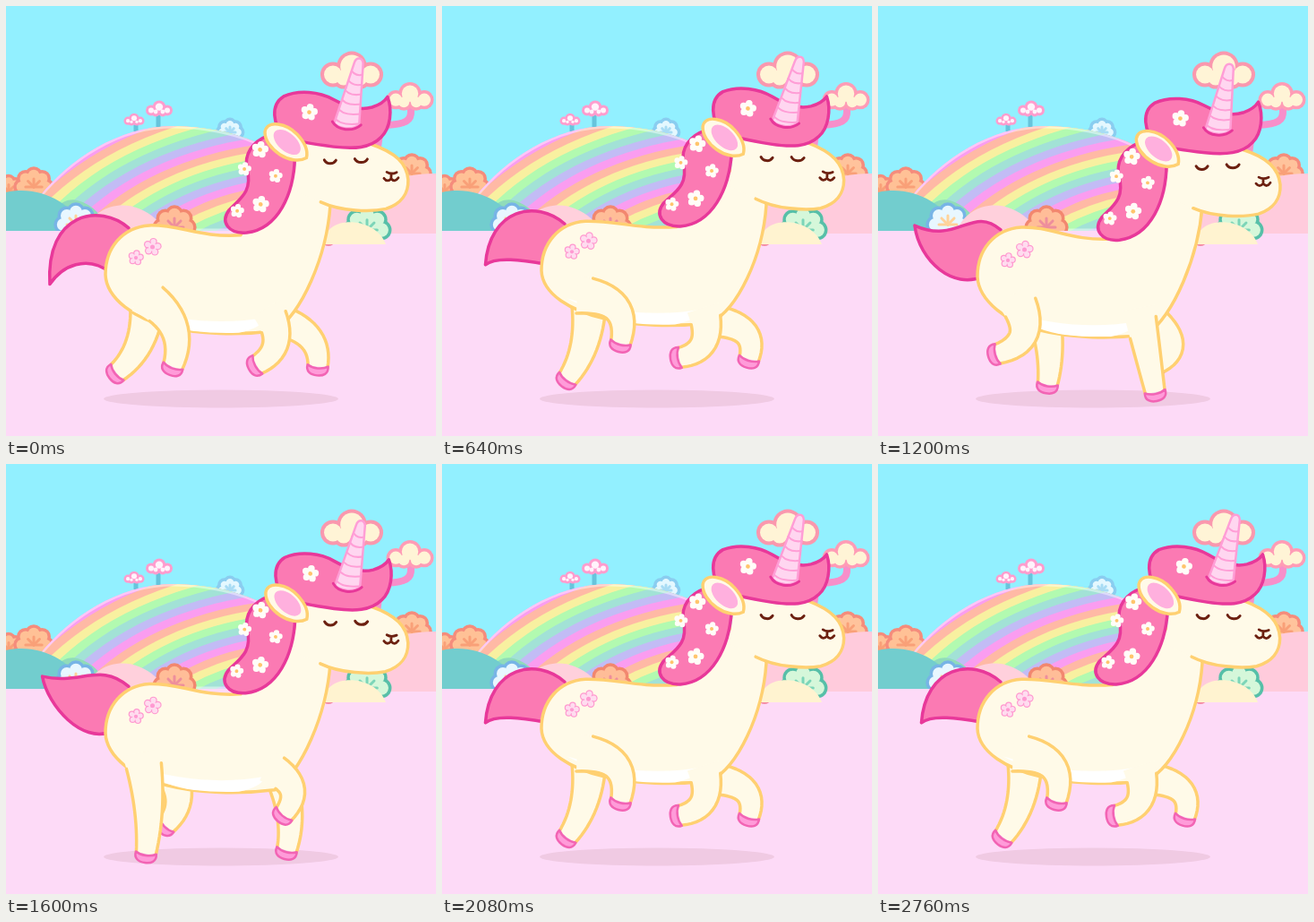
These frames come from a looping animation (480 px wide and 480 px high, 2.8 s). An HTML page with a canvas:

```html
<!DOCTYPE html>
<html lang="en">
<head>
<meta charset="utf-8">
<title>Trotting unicorn</title>
<style>
html, body { margin: 0; width: 100%; height: 100%; overflow: hidden; background: #92f0ff; }
canvas { display: block; width: 480px; height: 480px; }
</style>
</head>
<body>
<canvas id="stage" width="480" height="480"></canvas>
<script>
const ctx = document.getElementById('stage').getContext('2d');
const CREAM = '#fffae8', GOLD = '#ffd071', PINK = '#fb7ab3', ROSE = '#e8389a', BROWN = '#6c2010';
const LOOP = 2800, STEP = 40, CYCLE = 17, HALF = CYCLE / 2;

// Hoof paths over one stride: time, x, lift above the ground
const hindPath = [[0, 183, 33], [4, 155, 0], [8, 97, 42], [11, 124, 53], [15, 197, 59]];
const frontPath = [[0, 272, 35], [4, 304, 42], [8, 336, 36], [11, 311, 0], [12.5, 299, 0], [15, 256, 46]];

// Far legs run the same path half a stride later
const legs = {
  nearHind: { path: hindPath, lag: 0, dx: 0, ground: 444, lift: 1, hip: [151, 322], sway: 0, length: 124, width: 21 },
  farHind: { path: hindPath, lag: HALF, dx: 20, ground: 434, lift: 0.42, hip: [180, 334], sway: 0.35, length: 100, width: 19 },
  nearFront: { path: frontPath, lag: 0, dx: 0, ground: 440, lift: 1, hip: [291, 337], sway: 0, length: 102, width: 18 },
  farFront: { path: frontPath, lag: HALF, dx: 12, ground: 440, lift: 0.9, hip: [308, 352], sway: 0, length: 92, width: 17 }
};

const wave = (x, period, peak) => Math.cos(2 * Math.PI * (x - peak) / period);
const mix = (a, b, t) => a + (b - a) * t;

// Smooth closed curve through [time, x, y] points
function follow(path, x) {
  const n = path.length;
  const key = i => {
    const [t, ...v] = path[(i + n) % n];
    return { t: t + Math.floor(i / n) * CYCLE, v };
  };
  let i = n - 1;
  while (path[i][0] > x) i--;
  const [p, a, b, q] = [-1, 0, 1, 2].map(d => key(i + d));
  const span = b.t - a.t, u = (x - a.t) / span, u2 = u * u, u3 = u2 * u;
  return a.v.map((from, j) => {
    const to = b.v[j];
    const m0 = (to - p.v[j]) / (b.t - p.t) * span, m1 = (q.v[j] - from) / (q.t - a.t) * span;
    return mix(from, to, 3 * u2 - 2 * u3) + (u3 - 2 * u2 + u) * m0 + (u3 - u2) * m1;
  });
}

function shape(d, fill, stroke, width = 3.5) {
  const p = typeof d === 'string' ? new Path2D(d) : d;
  if (fill) { ctx.fillStyle = fill; ctx.fill(p); }
  if (stroke) { ctx.strokeStyle = stroke; ctx.lineWidth = width; ctx.stroke(p); }
}

function oval(x, y, rx, ry, fill, turn = 0) {
  const p = new Path2D();
  p.ellipse(x, y, rx, ry, turn, 0, 7);
  shape(p, fill);
}

function blobs(list, grow, color) {
  for (const [x, y, r] of list) oval(x, y, r + grow, r + grow, color);
}

function treetop(x, y, w, edge, fill, line) {
  const list = [[x, y - w * 0.08, w * 0.24 - line]];
  for (const side of [-1, 1]) {
    list.push([x + side * w * 0.3, y + w * 0.05, w * 0.2 - line]);
    list.push([x + side * w * 0.13, y + w * 0.1, w * 0.18 - line]);
  }
  blobs(list, line, edge);
  blobs(list, 0, fill);
}

// n circles spread along an arc
function fan(x, y, n, from, turn, dist, r) {
  return Array.from({ length: n }, (_, i) => {
    const a = from + i * turn;
    return [x + Math.cos(a) * dist, y + Math.sin(a) * dist, r];
  });
}

function bush(x, y, r, edge, mid, core) {
  const list = fan(x, y, 5, Math.PI, Math.PI / 4, r * 0.62, r * 0.3);
  blobs(list, 3.5, edge);
  blobs(list, 0, mid);
  oval(x, y, r * 0.6, r * 0.6, mid);
  for (const [bx, by] of list) shape(`M${x} ${y}L${mix(x, bx, 0.7)} ${mix(y, by, 0.7)}`, null, core, 3);
}

function flower(x, y, r, petal, core, edge) {
  const list = fan(x, y, 5, -1.4, Math.PI * 0.4, r * 0.6, r * (edge ? 0.3 : 0.4));
  if (edge) blobs(list, 1.2, edge);
  blobs(list, 0, petal);
  oval(x, y, r * 0.45, r * 0.45, petal);
  oval(x, y, r * 0.25, r * 0.25, core);
}

function rainbowHill() {
  const colors = ['#fa9df0', '#ffb9a5', '#f8f0a0', '#b2fab0', '#a2e2d6', '#c2bcf5'];
  const hill = new Path2D('M38 212C70 172 125 134 187 134C250 135 310 155 350 205V251H38Z');
  ctx.save();
  ctx.clip(hill);
  shape(hill, '#fbc3ee');
  for (let i = 0; i < 25; i++) {
    const s = 1.015 - i * 0.03;
    oval(340, 360, 375 * s, 260 * s, colors[i % 6]);
  }
  shape(hill, null, '#ffffff70', 5);
  ctx.restore();
}

function scenery() {
  ctx.fillStyle = '#92f0ff';
  ctx.fillRect(0, 0, 480, 480);

  shape('M145 133V139M170 122V137', null, '#68c4dc', 5);
  treetop(143, 127, 23, '#ff9dce', '#fff3fb', 2.5);
  treetop(171, 115, 30, '#ff9dce', '#fff3fb', 3);
  bush(250, 141, 14, '#8acdf0', '#e4f8ff', '#a8dcf4');
  bush(3, 207, 17, '#f58c7c', '#ffc196', '#f9a078');
  bush(31, 202, 21, '#f58c7c', '#ffc196', '#f9a078');
  rainbowHill();

  shape('M452 116C453 128 446 132 425 133M419 128L414 165', null, '#f78fca', 8);
  treetop(386, 73, 70, '#fa98ae', '#fff4d6', 4);
  treetop(451, 102, 53, '#ff9cb6', '#fff4d6', 3.5);
  bush(453, 187, 21, '#f58c7c', '#ffc39c', '#f9a078');

  shape('M330 251V232C370 212 430 187 480 187V256H330Z', '#ffcbdc');
  shape('M45 251C50 225 65 213 80 217C98 222 108 235 115 251Z', '#90dcba');
  shape('M0 208C35 200 72 217 90 251H0Z', '#72cdce');
  bush(78, 244, 23, '#77b4e6', '#e8f7ff', '#ffd39a');
  shape('M88 251C98 226 125 217 148 226C164 232 172 242 178 251Z', '#ffd0dc');
  bush(188, 247, 23, '#f2876f', '#ffbd98', '#ee8e9c');

  ctx.fillStyle = '#fddaf7';
  ctx.fillRect(0, 251, 480, 229);
  ctx.fillStyle = '#ffcbdc';
  ctx.fillRect(340, 249, 140, 5);
  bush(403, 250, 26, '#56bfa8', '#d5f7da', '#7cd5b8');
  oval(360, 264, 6, 4, '#f48da5');
  shape('M356 266C352 233 412 233 424 266Z', '#fff3d0');
  oval(240, 438.5, 131, 10, '#f0cae3');
}

// Two-part leg: the shorter the reach, the further the joint bends forward
function drawLeg(leg, k, body) {
  const [pathX, lift] = follow(leg.path, (k + leg.lag) % CYCLE);
  const tx = pathX + leg.dx, ty = leg.ground - lift * leg.lift;
  const hx = leg.hip[0] + (tx - leg.hip[0]) * leg.sway, hy = leg.hip[1];
  const reach = Math.hypot(tx - hx, ty - hy);
  const bend = Math.sqrt(Math.max(0, leg.length ** 2 - reach ** 2)) / 2 / reach;
  const kx = (hx + tx) / 2 + (ty - hy) * bend, ky = (hy + ty) / 2 - (tx - hx) * bend;
  const aim = Math.atan2(ty - ky, tx - kx);
  const ax = tx - Math.cos(aim) * 9, ay = ty - Math.sin(aim) * 9;

  const front = [], back = [], N = 16;
  for (let i = 0; i <= N; i++) {
    const t = i / N;
    const x0 = mix(hx, kx, t), y0 = mix(hy, ky, t), x1 = mix(kx, ax, t), y1 = mix(ky, ay, t);
    const x = mix(x0, x1, t), y = mix(y0, y1, t), vx = x1 - x0, vy = y1 - y0;
    const w = mix(leg.width, 11, t) / Math.hypot(vx, vy);
    front.push([x + vy * w, y - vx * w]);
    back.push([x - vy * w, y + vx * w]);
  }
  const line = pts => 'M' + pts.join('L');
  const outside = body ? back.findIndex(p => !ctx.isPointInPath(body, ...p)) : 0;
  shape(line([...front, ...back.slice().reverse()]) + 'Z', CREAM);
  shape(line(front.slice(body ? 2 : 0)), null, GOLD);
  shape(line(back.slice(Math.min(outside, 5))), null, GOLD);

  ctx.save();
  ctx.translate(tx, ty);
  ctx.rotate(aim - Math.PI / 2);
  shape('M-11.5 -10C-5 -6 5 -6 11.5 -10C13 -2 7 1 0 1C-7 1 -13 -2 -11.5 -10Z', '#ff9bd9', '#f264b4', 2.5);
  ctx.restore();
}

// The tail whips once per bounce and swings lower on every second one
function drawTail(k, rump) {
  const x = 45 + 5 * wave(k, HALF, 7.6);
  const y = 269 + 33 * wave(k, HALF, 8.1) + 10 * wave(k, CYCLE, 0);
  const curl = 0.45 + 0.35 * wave(k, HALF, 7.8) + 0.28 * wave(k, CYCLE, 0);
  shape(`M137 ${243 + rump}C105 ${215 + rump} ${x + mix(50, -3, curl)} ${y + mix(25, -77, curl)} ${x} ${y}
    C${x + mix(5, 13, curl)} ${y + mix(42, -18, curl)} ${mix(84, 90, curl)} ${mix(318, 278, curl)} 117 ${288 + 2 * rump}`, PINK, ROSE);
}

function bodyPath(r, c) {
  return new Path2D(`M290 200L262 ${246 + c}C215 ${249 + c} 195 ${239 + r} 160 ${240 + r}
    C130 ${242 + r} 111 ${265 + r} 111 ${295 + r}C112 ${322 + r} 145 ${340 + c} 180 ${348 + c}
    C215 ${357 + c} 260 ${358 + c} 300 ${353 + c}C330 ${338 + c * 0.5} 358 280 362 222L350 170Z`);
}

function drawBody(body, flank, c) {
  shape(body, CREAM, GOLD);
  ctx.save();
  ctx.clip(body);
  shape(`M140 ${326 + c}C200 ${345 + c} 250 ${345 + c} 290 ${338 + c}Q285 ${350 + c} 260 ${355 + c}
    C230 ${356 + c} 200 ${354 + c} 180 ${346 + c}Z`, '#fff');
  ctx.restore();
  flower(163.5, 262 + flank, 10, '#ffdcef', '#ff9ad2', '#ff98cf');
  flower(145, 274 + flank, 8.5, '#ffdcef', '#ff9ad2', '#ff98cf');
}

function drawHorn() {
  const horn = new Path2D('M365 134L386 66C388 59 395 59 396 66L393 135C385 141 372 140 365 134Z');
  shape(horn, '#ffd6f0', '#ff9ed6', 2.5);
  ctx.save();
  ctx.clip(horn);
  for (let i = 0; i < 6; i++) {
    const y = 74 + i * 11, x = 384 - i * 3.3;
    shape(`M${x - 3} ${y - 3}Q${x + 3} ${y + 9} 398 ${y + 4}`, null, '#ff9ed6', 2);
  }
  ctx.restore();
  shape('M363 132C369 142 386 143 395 135', null, ROSE, 3);
}

function drawHead(drop, tilt) {
  ctx.save();
  ctx.translate(430, 190 + drop);
  ctx.rotate(tilt * Math.PI / 180);
  ctx.translate(-430, -190);

  const face = 'M352 222C375 232 408 232 425 228C442 222 450 210 449 195C447 177 435 165 406 156';
  shape(face + 'L325 145L322 210Z', CREAM);
  shape(face, null, GOLD);

  shape(`M292 149C274 156 265 171 269 187C276 212 262 220 250 233C240 247 250 260 270 258
    C305 253 322 214 322 172L310 150Z`, PINK, ROSE);
  shape(`M312 151C295 137 294 114 308 105C325 97 348 99 363 107C378 115 394 119 407 115
    C416 112 421 108 424 103C430 118 428 138 418 148C406 161 388 162 365 160C345 158 326 156 312 151Z`, PINK, ROSE);

  shape('M335 173C318 183 288 164 288 145C290 131 312 135 324 147C332 155 337 164 335 173Z', CREAM, GOLD);
  oval(313, 156, 18, 10, '#ffb0de', 0.7);

  for (const [x, y, r] of [[337, 122, 9.5], [283, 165, 9.5], [285, 226, 9.5], [266, 187, 7.8], [301, 194, 7.8], [259, 234, 7.8]])
    flower(x, y, r, '#fffdf8', '#ffc56c');
  drawHorn();

  shape('M355 175C358 180 365 180 368 175M389 173C392 178 400 178 403 173', null, BROWN, 3);
  shape('M425 187Q430 190 436 187M430 190V194M422 194Q426 199 430 194Q434 199 438 193', null, BROWN, 2.8);
  ctx.restore();
}

function draw(ms) {
  // The stride is timed at 24 steps per second and shown at 25
  const k = Math.floor(Math.floor(ms % LOOP / STEP) * 0.96) % CYCLE;
  const bounce = Math.abs(Math.sin(Math.PI * (k - 6.4) / HALF));
  const body = bodyPath(7 * bounce, 14 * bounce);
  ctx.lineCap = ctx.lineJoin = 'round';
  scenery();
  drawTail(k, 7 * bounce);
  drawLeg(legs.farHind, k);
  drawLeg(legs.farFront, k);
  drawBody(body, 10 * bounce, 14 * bounce);
  drawLeg(legs.nearHind, k, body);
  drawLeg(legs.nearFront, k, body);
  drawHead(1 - 3.6 * wave(k, HALF, 7.4), 1.9 + 1.9 * wave(k, HALF, 5.9));
}

const start = performance.now();
function tick() {
  draw(performance.now() - start);
  requestAnimationFrame(tick);
}
tick();
</script>
</body>
</html>
```
